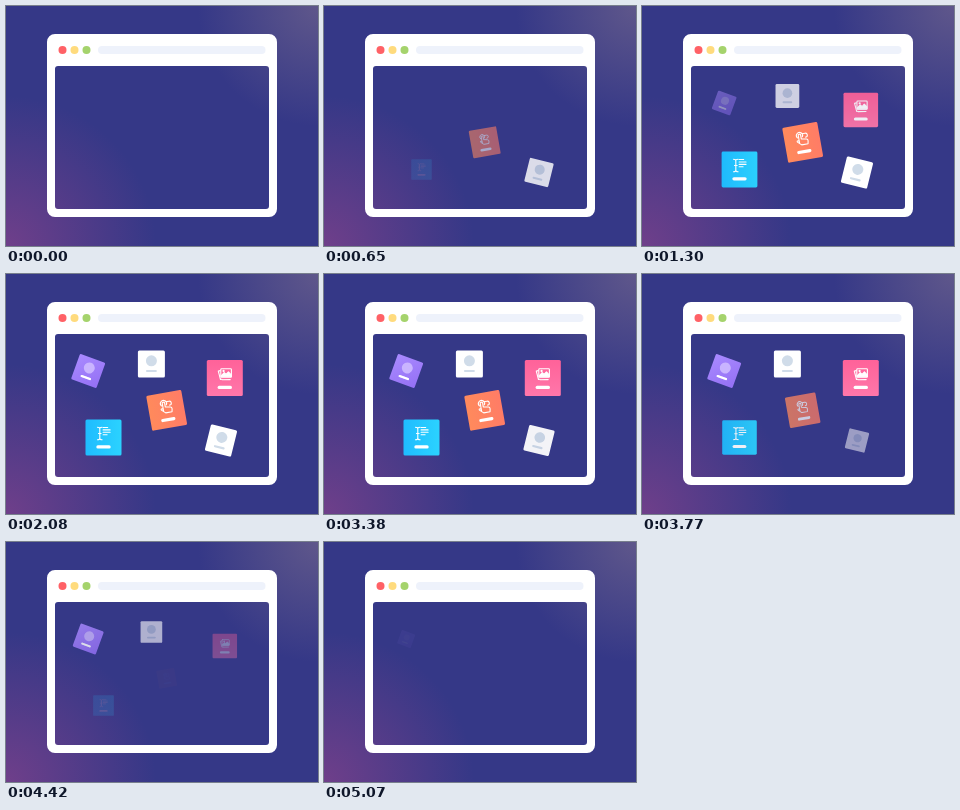
An HTML page that plays this animation: 312 px wide and 240 px high, repeating every 5.2 s.

```html
<!DOCTYPE html>
<html lang="en">
<head>
<meta charset="utf-8">
<title>Cards in a window</title>
<style>
  html, body { margin: 0; height: 100%; overflow: hidden; }
  body {
    background:
      radial-gradient(circle at 0 100%, #6f3f8a 0, #6f3f8a00 150px),
      radial-gradient(circle at 100% 0, #5f578b 0, #5f578b00 120px),
      #353887;
  }
  svg { display: block; width: 100vw; height: 100vh; }
  .line { fill: none; stroke: #fff; stroke-width: 1.1; stroke-linecap: round; stroke-linejoin: round; }
</style>
</head>
<body>
<svg viewBox="0 0 312 240">
  <defs>
    <linearGradient id="purple" x2="1" y2="1"><stop stop-color="#a98aff"/><stop offset="1" stop-color="#9470f4"/></linearGradient>
    <linearGradient id="pink" x2="0" y2="1"><stop stop-color="#ff6299"/><stop offset="1" stop-color="#ff77aa"/></linearGradient>
    <linearGradient id="orange" x2="1" y2="0"><stop stop-color="#ff8a5c"/><stop offset="1" stop-color="#ff7c66"/></linearGradient>
    <linearGradient id="blue" x2="1" y2="0"><stop stop-color="#1fbcff"/><stop offset="1" stop-color="#2bd2ff"/></linearGradient>

    <g id="person">
      <circle cy="-3.2" r="5.5"/>
      <rect x="-5.5" y="5.9" width="11" height="2.2" rx="1.1"/>
    </g>
    <g id="text" class="line">
      <path d="M-6-10.3q2.3 0 2.3 1.5V.7q0 1.5-2.3 1.5M-1.4-10.3q-2.3 0-2.3 1.5V.7q0 1.5 2.3 1.5M-5-4h2.6"/>
      <path d="M-.4-10h4.6M-.4-7.6h7M-.4-5.2h7M-.4-2.8h4"/>
    </g>
    <g id="touch" class="line">
      <path d="M-4.4-5.3a3.1 3.1 0 1 1 5-.2M.6-8.6h3.2a2 2 0 0 1 0 4"/>
      <path d="M-3.2 0V-7.4a1.2 1.2 0 0 1 2.4 0v3.8l4.9 1q1.7.4 1.5 2l-.6 3H-1.4L-5.2-1.1q-.4-1.5 1.1-1.1l.9.9"/>
    </g>
    <g id="photos" class="line">
      <path d="M-4.6-7.4l-1.9.5 2.2 8.4 1.5-.2"/>
      <rect x="-4" y="-9.3" width="10.6" height="8.6" rx=".8"/>
      <path d="M-3.6-2.2l3-3.2 2 1.8 2.2-2.6 2.8 3v2H-3.6z" fill="#fff"/>
      <circle cx="-1.2" cy="-7" r=".6"/>
      <path d="M-2.6 1.7l8-.1"/>
    </g>
  </defs>

  <path fill="#fff" fill-rule="evenodd" d="M49 28H263a8 8 0 0 1 8 8V203a8 8 0 0 1-8 8H49a8 8 0 0 1-8-8V36a8 8 0 0 1 8-8z
    M52 60a3 3 0 0 0-3 3V200a3 3 0 0 0 3 3H260a3 3 0 0 0 3-3V63a3 3 0 0 0-3-3z"/>
  <circle cx="56.5" cy="44" r="4" fill="#ff6166"/>
  <circle cx="68.5" cy="44" r="4" fill="#ffdb7d"/>
  <circle cx="80.5" cy="44" r="4" fill="#a5d36c"/>
  <rect x="92" y="40" width="167.5" height="8" rx="4" fill="#eef2fb"/>
  <g id="cards"></g>
</svg>
<script>
const LOOP = 5200;
const ENTER = { start: 255, gap: 176, length: 900 };
const LEAVE = { start: 3202, gap: 180, length: 1150 };

// In order of appearance
const cards = [
  { x: 215, y: 166.5, turn: 14, size: 27, fill: '#fff', icon: 'person', ink: '#d0dce9' },
  { x: 160.7, y: 136.3, turn: -10, size: 35.5, fill: 'url(#orange)', icon: 'touch' },
  { x: 97.5, y: 163.5, turn: 0, size: 36, fill: 'url(#blue)', icon: 'text' },
  { x: 218.8, y: 104, turn: 0, size: 36, fill: 'url(#pink)', icon: 'photos' },
  { x: 145.4, y: 90, turn: 0, size: 27, fill: '#fff', icon: 'person', ink: '#d0dce9' },
  { x: 82.2, y: 97, turn: 20, size: 27, fill: 'url(#purple)', icon: 'person', ink: '#c9b4ff' },
];

const cardMarkup = ({ size, fill, icon, ink }) => `<g>
  <rect x="${-size / 2}" y="${-size / 2}" width="${size}" height="${size}" rx="1.5" fill="${fill}"/>
  <use href="#${icon}" ${ink ? `fill="${ink}"` : ''}/>
  ${ink ? '' : '<rect x="-7.2" y="7.8" width="14.4" height="3.2" rx="1.6" fill="#fff"/>'}
  ${fill === 'url(#purple)' ? '<rect x="-5.5" y="5.9" width="11" height="2.2" rx="1.1" fill="#fff"/>' : ''}
</g>`;

const layer = document.getElementById('cards');
layer.innerHTML = cards.map(cardMarkup).join('');

const progress = (t, { start, gap, length }, i) =>
  Math.min(1, Math.max(0, (t - start - i * gap) / length));
const easeOut = p => 1 - (1 - p) ** 3;
const easeInOut = p => (1 - Math.cos(Math.PI * p)) / 2;

function draw(now) {
  const t = now % LOOP;
  cards.forEach(({ x, y, turn }, i) => {
    const shown = easeOut(progress(t, ENTER, i)) * (1 - easeInOut(progress(t, LEAVE, i)));
    const node = layer.children[i];
    node.setAttribute('opacity', shown);
    node.setAttribute('transform', `translate(${x} ${y}) rotate(${turn}) scale(${0.5 + shown / 2})`);
  });
}

let origin;
function tick(now) {
  origin ??= now;
  draw(now - origin);
  requestAnimationFrame(tick);
}
draw(0);
requestAnimationFrame(tick);
</script>
</body>
</html>
```
